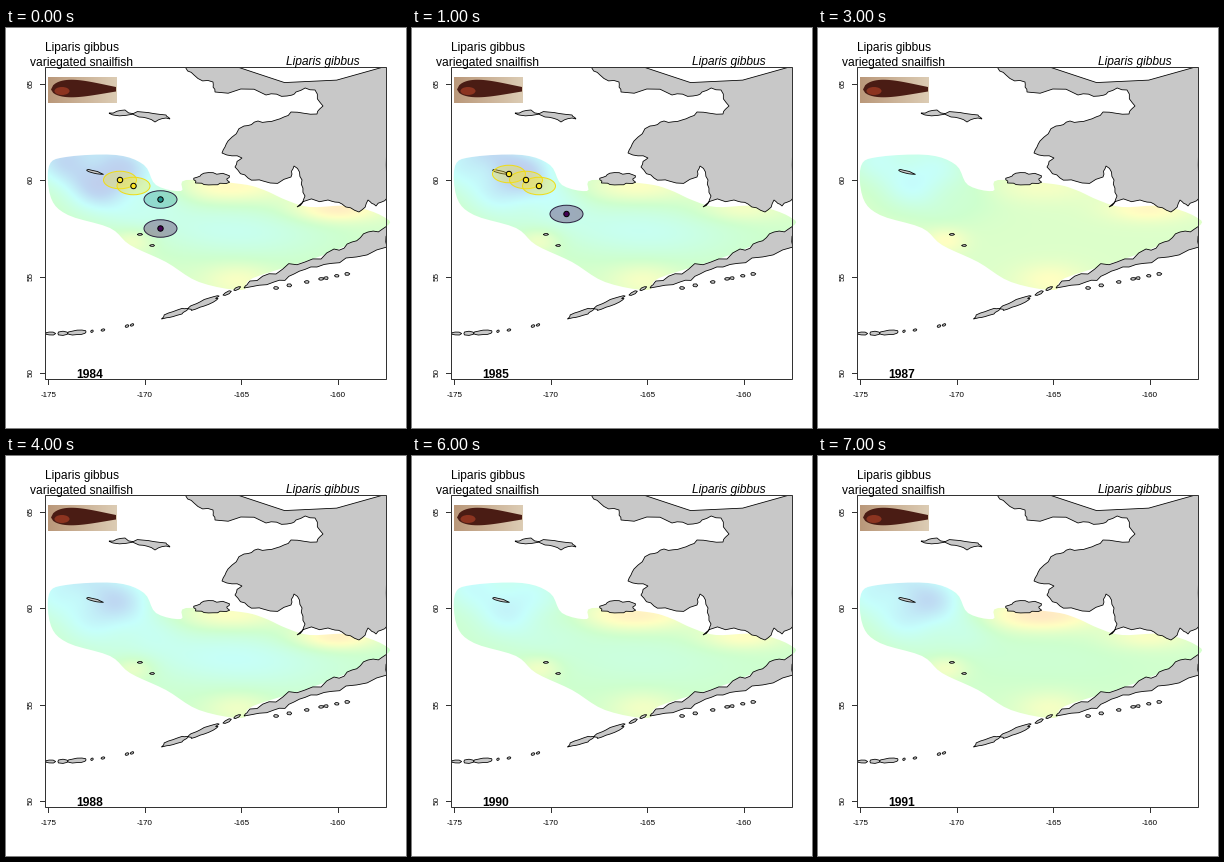
These frames come from a looping animation (400 px wide and 400 px high, 8 s). A matplotlib script:

```python
import numpy as np
import matplotlib.pyplot as plt
from matplotlib.animation import FuncAnimation
from matplotlib.colors import to_rgba
from matplotlib.patches import Circle, Ellipse, Polygon, Rectangle

PX = 0.72  # points per pixel at 100 dpi
FONT = "Liberation Sans"
LINE = "#333333"
YEARS = range(1984, 1992)
rng = np.random.default_rng(7)

# Per year: base level, cold in the northwest, cold mid-shelf pool,
# warmth along the north coast, warmth in the east
CLIMATE = {
    1984: (3.2, 2.7, 0.9, 1.0, 1.4),
    1986: (3.1, 2.1, 0.9, 0.7, 0.0),
    1987: (3.3, 1.4, 0.0, 0.5, 0.9),
    1988: (3.0, 1.8, 0.9, 1.0, 1.5),
    1989: (3.0, 0.7, 0.6, 1.2, 1.2),
    1991: (3.1, 1.9, 0.2, 1.6, 0.8),
}
for gap in (1985, 1990):
    CLIMATE[gap] = np.mean([CLIMATE[gap - 1], CLIMATE[gap + 1]], axis=0)

# Pastel ramp from cold to warm
RAMP = ["#c2c2e6", "#bed7f2", "#c6fffc", "#ceffce", "#ffffc2", "#ffdec4"]

YELLOW, TEAL, DARK = "#fde725", "#21908c", "#440154"
SIGHTINGS = {
    1984: {YELLOW: [(114, 152), (127.5, 158)], TEAL: [(154.5, 171.5)],
           DARK: [(154.5, 200.5)]},
    1985: {YELLOW: [(97, 146), (114, 152), (127, 158)], DARK: [(154.5, 186)]},
    1986: {YELLOW: [(97.5, 133), (74.5, 146), (75.5, 152.5), (99.5, 146),
                    (100, 152.5), (96, 155.5), (127.5, 146), (127, 158),
                    (66, 165.5), (104, 165)],
           DARK: [(230, 184)]},
}

SURVEY = [
    (43, 138), (60, 129), (110, 127), (138, 137), (150, 157), (175, 163),
    (180, 152), (235, 156), (258, 162), (280, 172), (304, 179), (345, 178),
    (378, 189), (378, 200), (315, 228), (247, 250), (236, 262), (193, 254),
    (160, 234), (124, 217), (104, 200), (62, 187), (45, 170)]

MAINLAND = [
    (176, 38), (188, 47), (207, 54), (209, 64), (260, 67), (281, 68),
    (290, 64), (309, 62), (317, 78), (311, 86), (285, 84), (270, 92),
    (252, 93), (238, 98), (222, 113), (216, 125), (236, 130), (229, 139),
    (242, 150), (257, 153), (285, 149), (288, 138), (296, 152), (299, 168),
    (291, 179), (322, 172), (336, 176), (353, 184), (362, 172), (370, 178),
    (381, 170), (381, 38)]

PENINSULA = [
    (381, 198), (362, 204), (346, 214), (328, 221), (299, 234), (270, 246),
    (244, 253), (238, 260), (268, 254), (288, 246), (311, 239), (340, 230),
    (381, 219)]

ST_LAWRENCE = [(103, 85), (119, 82), (136, 84), (160, 87), (164, 91),
               (149, 94), (133, 89), (107, 87)]


def roughen(points, amount=0.16, rounds=2):
    """Closed coastline with random midpoint displacement."""
    pts = np.array(points, float)
    for _ in range(rounds):
        step = np.roll(pts, -1, axis=0) - pts
        normal = np.stack([-step[:, 1], step[:, 0]], axis=1)
        push = rng.uniform(-amount, amount, (len(pts), 1))
        mid = pts + step / 2 + normal * push
        pts = np.stack([pts, mid], axis=1).reshape(-1, 2)
    return pts


def smooth(points):
    """Closed Catmull-Rom curve through the points."""
    p = np.array(points, float)
    a, c, d = (np.roll(p, k, axis=0) for k in (1, -1, -2))
    parts = [p + 0.5 * t * (c - a + t * (2 * a - 5 * p + 4 * c - d
                                         + t * (3 * (p - c) + d - a)))
             for t in np.linspace(0, 1, 6)[:-1]]
    return np.stack(parts, axis=1).reshape(-1, 2)


def blob(x, y, length, height, tilt=0.0):
    """Ragged island around a centre; tilt is its slope."""
    a = np.linspace(0, 2 * np.pi, max(6, int(length * 0.7)), endpoint=False)
    r = rng.uniform(0.8, 1.15, len(a)) / 2
    dx = length * r * np.cos(a)
    return np.stack([x + dx, y + height * r * np.sin(a) + tilt * dx], axis=1)


def bump(gx, gy, x, y, sx, sy, tilt=0.0):
    return np.exp(-((gx - x) / sx) ** 2 / 2
                  - ((gy - y - tilt * (gx - x)) / sy) ** 2 / 2)


def field(year):
    """Colour map of one year's temperatures."""
    base, cold, pool, north, east = CLIMATE[year]
    gx, gy = np.meshgrid(np.arange(1, 400, 2), np.arange(1, 400, 2))
    patchy = 1 + 0.25 * np.sin(gx / 14 + year) * np.cos(gy / 12 - year)
    level = (base
             - cold * patchy * bump(gx, gy, 92, 142, 42, 27, 0.25)
             - pool * bump(gx, gy, 230, 203, 65, 19, 0.05)
             + north * bump(gx, gy, 222, 159, 40, 11)
             + east * bump(gx, gy, 330, 181, 30, 9)
             + 0.8 * bump(gx, gy, 128, 212, 15, 9)
             + 0.7 * bump(gx, gy, 232, 252, 25, 12))
    colors = np.array([to_rgba(c)[:3] for c in RAMP])
    steps = np.arange(len(RAMP))
    return np.stack([np.interp(level, steps, colors[:, k]) for k in range(3)], -1)


fig = plt.figure(figsize=(4, 4), dpi=100, facecolor="white")
ax = fig.add_axes([0, 0, 1, 1])
ax.axis("off")
box = ax.add_patch(Rectangle((38.5, 38.5), 341, 312, fill=False, ec=LINE,
                             lw=PX, zorder=6))


def label(x, y, text, size=12, **style):
    style = {"ha": "center", "va": "baseline", **style}
    return ax.text(x, y, text, fontsize=size * PX, family=FONT, zorder=9, **style)


def land(outline):
    shape = ax.add_patch(Polygon(outline, fc="#c8c8c8", ec="black",
                                 lw=0.8 * PX, zorder=3))
    shape.set_clip_path(box)


def draw_land():
    for outline in (MAINLAND, PENINSULA, ST_LAWRENCE):
        land(roughen(outline))
    land(blob(206, 151, 36, 12))
    land(blob(88, 144, 17, 3, 0.25))
    land(blob(134, 206.5, 5, 2))
    land(blob(146, 217.5, 5, 2))
    # The Aleutian arc: position along it and length of each island
    for x, length in [(44, 10), (57, 12), (71, 18), (86, 3), (97, 4), (121, 4),
                      (126, 4), (169, 26), (197, 30), (221, 8), (231, 7)]:
        y = 305.5 - 0.0013 * (x - 45) ** 2
        land(blob(x, y, length, 2 + 0.15 * length, -0.0026 * (x - 45)))
    for x in (270, 283, 301, 315, 320, 331, 341):
        land(blob(x, 260 - 0.2 * (x - 270), 5, 3))


def draw_axes():
    for i in range(4):
        x, y = 42 + 96.5 * i, 345 - 96.5 * i
        ax.plot([x, x], [350.5, 355.5], color=LINE, lw=PX, zorder=6)
        ax.plot([33.5, 38.5], [y, y], color=LINE, lw=PX, zorder=6)
        label(x + 0.5, 369, str(5 * i - 175), 8)
        label(25, y, str(5 * i + 50), 8, rotation=90, va="center")


def draw_photo():
    tone = np.linspace(to_rgba("#ba987a"), to_rgba("#dcccb4"), 40)[None]
    ax.imshow(tone, extent=(42, 111, 75, 49), aspect="auto", zorder=7)
    t = np.linspace(0, 1, 30)
    x, half = 45 + 65 * t, 9 * np.sin(np.pi * t ** 0.55) + 2.5 * t
    body = np.column_stack([np.r_[x, x[::-1]],
                            np.r_[61.5 - half, (61.5 + 0.8 * half)[::-1]]])
    ax.add_patch(Polygon(body, fc="#4a1c14", ec="none", zorder=7.1))
    ax.add_patch(Ellipse((56, 63), 15, 8, fc="#8c3420", zorder=7.2))


def sighting(x, y, color):
    rim = "#f0dc14" if color == YELLOW else "#2b2440"
    area = Ellipse((x, y), 33, 17.5, fc=to_rgba(color, 0.33), ec=rim,
                   lw=PX, zorder=4)
    dot = Circle((x, y), 2.7, fc=color, ec="black", lw=PX, zorder=5)
    return [ax.add_patch(area), ax.add_patch(dot)]


fields = [field(year) for year in YEARS]
heat = ax.imshow(fields[0], extent=(0, 400, 400, 0), aspect="auto",
                 interpolation="bilinear", zorder=1)
heat.set_clip_path(Polygon(smooth(SURVEY), transform=ax.transData))

draw_land()
draw_axes()
draw_photo()
label(76, 23, "Liparis gibbus")
label(76, 38, "variegated snailfish")
label(316.5, 37, "Liparis gibbus", style="italic")
year_text = label(84, 350, "", weight="bold")
extinct_text = label(325, 350, "Extinction")

marks = {year: [patch for color, spots in groups.items() for x, y in spots
                for patch in sighting(x, y, color)]
         for year, groups in SIGHTINGS.items()}

ax.set_xlim(0, 400)
ax.set_ylim(400, 0)


def update(i):
    now = YEARS[i]
    heat.set_data(fields[i])
    year_text.set_text(str(now))
    extinct_text.set_visible(now == 1986)
    for year, patches in marks.items():
        for patch in patches:
            patch.set_visible(year == now)
    return []


anim = FuncAnimation(fig, update, frames=len(YEARS), interval=1000,
                     init_func=lambda: update(0), repeat=True, repeat_delay=0)
plt.show()
```
